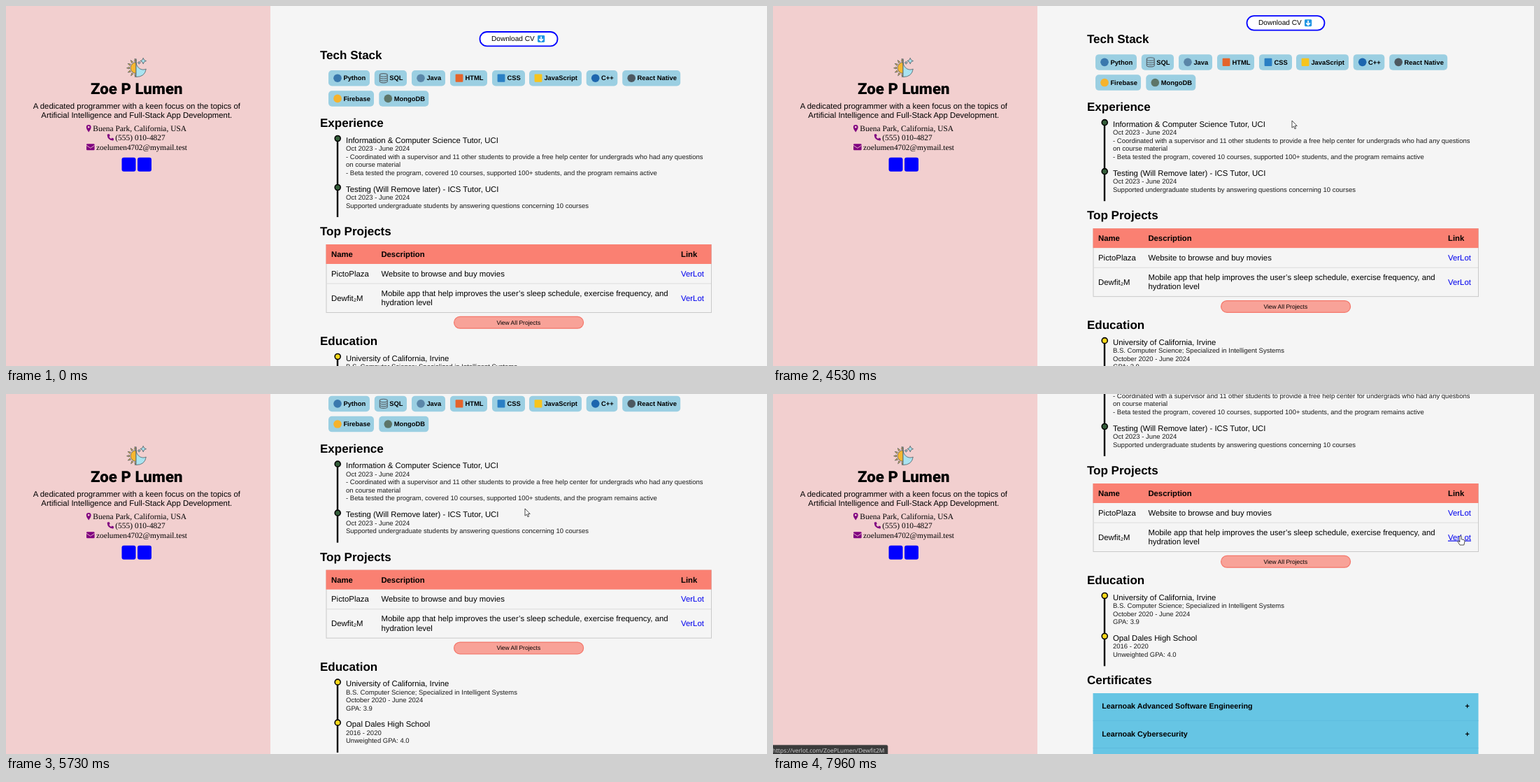
Animation of 1088x515 px, one loop 8 s. Source, as an HTML page:

```html
<!DOCTYPE html>
<html lang="en">
<head>
<meta charset="utf-8">
<title>Resume page</title>
<style>
  html, body { margin: 0; width: 100%; height: 100%; overflow: hidden; background: #f5f5f5; }
  svg { display: block; width: 1088px; height: 515px; }
  text { font-family: "Liberation Sans", Arial, sans-serif; text-rendering: geometricPrecision; white-space: pre; }
  .bold { font-weight: 700; }
  .mid { text-anchor: middle; }
  .small { fill: #1c1c1c; }
  .serif { font-family: "Liberation Serif", "Times New Roman", serif; }
  .name { font-family: Roboto, sans-serif; font-weight: 800; }
  .link { fill: #0000ee; }
  .url { font-family: "Open Sans", "Noto Sans", sans-serif; fill: #d2d2d2; }
</style>
</head>
<body>
<svg viewBox="0 0 1088 515">
  <g id="page"></g>
  <g id="side"></g>
  <g id="status"><path id="bubble" fill="#3b3b3b" stroke="#555" stroke-width=".6"/><text id="url" class="url" x="-1" y="512.6" font-size="8.4"></text></g>
  <g id="cursor" fill="#fff" stroke="#222" stroke-width=".8" stroke-linejoin="round">
    <path id="arrow" d="M0 0V10.2L2.4 8.1 4 11.8 5.6 11.1 4.1 7.5H7.2Z"/>
    <path id="hand" d="M-1.2 0Q-1.1-1 0-1T1.2 0V3.8L4.6 4.6Q6.2 5 6 6.8L4.8 12H-1L-3.9 7.4Q-4.2 6.2-3 6.2L-1.2 7.8Z"/>
  </g>
</svg>
<script>
const LOOP = 8000;
const $ = id => document.getElementById(id);

const text = (x, y, s, size = 11.4, cls = '', extra = '') =>
  `<text x="${x}" y="${y}" font-size="${size}" class="${cls}" ${extra}>${s}</text>`;
const rect = (x, y, w, h, fill, r = 0, extra = '') =>
  `<rect x="${x}" y="${y}" width="${w}" height="${h}" rx="${r}" fill="${fill}" ${extra}/>`;
const circle = (x, y, r, fill, extra = '') => `<circle cx="${x}" cy="${y}" r="${r}" fill="${fill}" ${extra}/>`;
const path = (d, extra) => `<path d="${d}" ${extra}/>`;
const heading = (y, s) => text(449, y, s, 17, 'bold');

// icon: 'o' circle, 's' square, 'd' database cylinder
function badge(x, y, w, label, icon, color) {
  const cx = x + 13, cy = y + 11.2;
  const mark = icon == 'o' ? circle(cx, cy, 5.8, color)
    : icon == 's' ? rect(cx - 5.4, cy - 5.6, 10.8, 11.2, color, 1)
    : path(`M${cx - 5.5} ${cy - 4.4}a5.5 2.2 0 0 1 11 0v8.8a5.5 2.2 0 0 1-11 0Z
        m0 0a5.5 2.2 0 0 0 11 0m-11 3a5.5 2.2 0 0 0 11 0m-11 3a5.5 2.2 0 0 0 11 0`,
        `fill="none" stroke="${color}" stroke-width="1.2"`);
  return rect(x, y, w, 22.5, '#9bcfe2', 5) + mark + text(x + 21.4, y + 14.4, label, 9.4, 'bold');
}

function timeline(end, color, entries) {
  const top = entries[0][0];
  return rect(472.8, top, 2.4, end - top, '#000') + entries.map(([y, title, ...lines]) =>
    circle(474.2, y, 4, color, 'stroke="#000" stroke-width="1.6"') + text(486, y + 6, title, 11.33) +
    lines.map((s, i) => text(486, y + 17.6 + i * 11.5, s, 9.5, 'small')).join('')).join('');
}

const projectLink = (y, id) => text(965, y, 'VerLot', 11.4, 'link', `id="${id}"`);

function drawPage() {
  const dates = 'Oct 2023 - June 2024';
  return rect(677.5, 37, 111, 20.4, '#fff', 10.2, 'id="cv" stroke="#00f" stroke-width="1.8"') +
    text(694, 50.3, 'Download CV', 10.1, '', 'id="cvText"') +
    rect(760, 42, 10.2, 10, '#2196e3', 1.4) +
    path('M765.1 43.6V49.6M762.3 47.2l2.8 2.9 2.8-2.9', 'fill="none" stroke="#fff" stroke-width="1.7"') +
    heading(76, 'Tech Stack') +
    badge(461, 92, 59, 'Python', 'o', '#3a78ad') +
    badge(526.8, 92, 46.2, 'SQL', 'd', '#5b6870') +
    badge(580, 92, 48, 'Java', 'o', '#5a86a8') +
    badge(635, 92, 53, 'HTML', 's', '#e5642b') +
    badge(695, 92, 47, 'CSS', 's', '#2a7fc4') +
    badge(748, 92, 75, 'JavaScript', 's', '#f7c41c') +
    badge(829.7, 92, 44.6, 'C++', 'o', '#1d66ae') +
    badge(881.2, 92, 83, 'React Native', 'o', '#4d5961') +
    badge(461, 121.2, 65, 'Firebase', 'o', '#f6b32c') +
    badge(533.3, 121.2, 71, 'MongoDB', 'o', '#5d7568') +

    heading(173, 'Experience') +
    timeline(302, '#355e3b', [
      [189.5, 'Information &amp; Computer Science Tutor, UCI', dates,
        '- Coordinated with a supervisor and 11 other students to provide a free help center for undergrads who had any questions',
        'on course material',
        '- Beta tested the program, covered 10 courses, supported 100+ students, and the program remains active'],
      [259.5, 'Testing (Will Remove later) - ICS Tutor, UCI', dates,
        'Supported undergraduate students by answering questions concerning 10 courses']]) +

    heading(328.3, 'Top Projects') +
    rect(458, 341.5, 550.5, 97, 'none', 0, 'stroke="#c9c9c9"') +
    rect(457.5, 341, 551, 28, '#fa8072') +
    rect(458, 396.6, 550, 1, '#dcdcdc') +
    text(465, 359, 'Name', 11.33, 'bold') + text(536.4, 359, 'Description', 11.33, 'bold') +
    text(965, 359, 'Link', 11.33, 'bold') +
    text(465, 386.8, 'PictoPlaza') + text(536.4, 386.8, 'Website to browse and buy movies') +
    projectLink(386.8, 'link1') +
    text(465, 421.6, 'Dewfit₂M') +
    text(536.4, 414.8, 'Mobile app that help improves the user’s sleep schedule, exercise frequency, and') +
    text(536.4, 428, 'hydration level') + projectLink(421.6, 'link2') +
    rect(640.6, 444.4, 185, 16.8, '#f8a298', 8.4, 'stroke="#f4776b" stroke-width="1.2"') +
    text(732.8, 455.8, 'View All Projects', 8.5, 'mid') +

    heading(485, 'Education') +
    timeline(602.3, '#ffd91a', [
      [501.5, 'University of California, Irvine', 'B.S. Computer Science; Specialized in Intelligent Systems',
        'October 2020 - June 2024', 'GPA: 3.9'],
      [559.5, 'Opal Dales High School', '2016 - 2020', 'Unweighted GPA: 4.0']]) +

    heading(628.3, 'Certificates') +
    rect(457.5, 641, 551, 118, '#66c5e4') +
    ['Advanced Software Engineering', 'Cybersecurity'].map((s, i) => {
      const y = 663.3 + i * 39.2;
      return text(470.3, y, 'Learnoak ' + s, 10.75, 'bold') + text(992.6, y, '+', 10.75, 'bold mid') +
        rect(457.5, y + 16.5, 551, .8, '#5cb9dc');
    }).join('');
}

function sunMoon() {
  const ink = 'stroke="#4f5d63" stroke-width=".8" stroke-linejoin="round"';
  let rays = '';
  for (let i = 0; i < 7; i++) {
    const a = (95 + i * 28) * Math.PI / 180, at = (r, d) => `${186 + r * Math.cos(a + d)} ${88.5 + r * Math.sin(a + d)}`;
    rays += path(`M${at(9.6, -.13)}L${at(13.4, 0)}L${at(9.6, .13)}Z`, `fill="#f6b93b" ${ink}`);
  }
  const star = (x, y, r) => path(`M${x} ${y - r}l${r * .3} ${r * .7} ${r * .7} ${r * .3} ${-r * .7} ${r * .3} ${-r * .3} ${r * .7}
    ${-r * .3} ${-r * .7} ${-r * .7} ${-r * .3} ${r * .7} ${-r * .3}Z`, `fill="#a9e3f0" ${ink}`);
  return rays + path('M186 80.5a8 8 0 0 0 0 16Z', `fill="#f7b731" ${ink}`) +
    path('M186 75.5Q185 84 189.5 88.3T200.3 90.2Q198.5 101.5 186 101.5Z', `fill="#a9e3f0" ${ink}`) +
    star(196.2, 78.6, 4.3) + star(190.3, 81.2, 2);
}

function drawSide() {
  const purple = 'fill="#800080"';
  return rect(0, 0, 378, 515, '#f2cfcf') + sunMoon() +
    text(186.8, 126, 'Zoe P Lumen', 22.2, 'name mid') +
    text(186.8, 147, 'A dedicated programmer with a keen focus on the topics of', 11.4, 'mid') +
    text(186.8, 160.2, 'Artificial Intelligence and Full-Stack App Development.', 11.4, 'mid') +
    path('M118.2 180.6Q114.8 176 114.8 173.3a3.4 3.4 0 0 1 6.8 0Q121.6 176 118.2 180.6ZM118.2 171.8a1.4 1.4 0 1 0 .01 0Z',
      purple + ' fill-rule="evenodd"') +
    text(124.3, 179.2, 'Buena Park, California, USA', 11.45, 'serif') +
    path('M145.5 183.6l2-.5 1.2 2.6-1.3 1.3q1 2 2.9 2.9l1.3-1.4 2.6 1.3-.5 2.1q-.2.7-1 .7-7.6-.6-8-8 0-.8.8-1Z', purple) +
    text(156.3, 192.3, '(555) 010-4827', 11.45, 'serif') +
    rect(115, 197.3, 11.6, 9, '#800080', 1.1) +
    path('M115 199.4l5.8 3.9 5.8-3.9', 'fill="none" stroke="#f2cfcf" stroke-width=".9"') +
    text(129, 205.6, 'zoelumen4702@mymail.test', 11.3, 'serif') +
    rect(165.5, 216.7, 20, 20, '#00f', 3) + rect(188, 216.7, 20, 20, '#00f', 3);
}

// Each key is [time, value, ...]; linear between keys
function track(keys, t) {
  const i = keys.findIndex(k => k[0] > t);
  if (i < 0) return keys[keys.length - 1].slice(1);
  if (!i) return keys[0].slice(1);
  const a = keys[i - 1], b = keys[i], p = (t - a[0]) / (b[0] - a[0]);
  return a.slice(1).map((v, j) => v + (b[j + 1] - v) * p);
}

const cursorPath = [
  [290, 966, 458], [490, 721, 330], [780, 721, 330], [960, 378, 197], [1170, 378, 197],
  [1400, 290, 140], [1550, 235, 137], [1750, 190, 180], [1950, 170, 219], [2020, 170, 219],
  [2090, 186, 237], [2160, 186, 237], [2300, 177, 227], [2550, 200, 227], [2830, 194, 224],
  [2870, 194, 224], [3140, 594, 119], [3250, 594, 119], [3560, 728, 46], [3720, 733, 40],
  [3985, 733, 40], [4250, 742, 164], [6650, 742, 164], [6850, 800, 154], [7150, 910, 156],
  [7430, 985, 168], [7480, 985, 168], [7620, 984, 172], [7760, 982, 198], [7960, 983, 204]];
const scrollPath = [
  [4350, 0], [4390, 4], [4520, 22], [4650, 32], [4790, 36.5], [4950, 36.5], [5130, 66], [5330, 86],
  [5700, 86], [5730, 89], [5870, 138], [6010, 160], [6270, 160], [6300, 170], [6380, 199.5], [6430, 208], [6500, 213]];
const buttonFade = [[3480, 0], [3680, 1], [3990, 1], [4200, 0]];
const statusFade = [
  [2300, 0], [2400, 1], [2640, 1], [2820, 0], [3540, 0], [3640, 1], [3850, 1], [3920, .5],
  [4250, .1], [4390, 0], [7560, 0], [7640, 1]];

const host = 'https://verlot.com/ZoePLumen';
const statusAt = t =>
  t < 3000 ? [host, 124]
  : t < 7000 ? ['https://zoeplumen.verlot.io/resume/Resume_Zoe_Lumen.pdf', 238]
  : t < 7760 ? [host + '/PictoPlaza', 168]
  : [host + '/Dewfit2M', 164];

function render(t) {
  $('page').setAttribute('transform', `translate(0 ${-track(scrollPath, t)[0]})`);

  const [x, y] = track(cursorPath, t);
  const onRow = rowY => t >= 7500 && Math.abs(y - rowY) < 7;
  const pointing = t > 2200 && t < 2890 || t > 3500 && t < 4010 || onRow(169) || onRow(204);
  $('cursor').setAttribute('transform', `translate(${x} ${y})`);
  $('cursor').style.display = t < 290 ? 'none' : '';
  $('arrow').style.display = pointing ? 'none' : '';
  $('hand').style.display = pointing ? '' : 'none';
  $('link1').style.textDecoration = onRow(169) ? 'underline' : 'none';
  $('link2').style.textDecoration = onRow(204) ? 'underline' : 'none';

  const b = track(buttonFade, t)[0], pale = 255 * (1 - b);
  $('cv').setAttribute('fill', `rgb(${pale},${pale},255)`);
  $('cvText').setAttribute('fill', `rgb(${255 * b},${255 * b},${255 * b})`);

  const [url, width] = statusAt(t);
  $('status').setAttribute('opacity', track(statusFade, t)[0]);
  $('bubble').setAttribute('d', `M-2 502.3H${width - 2}q2 0 2 2V517H-2Z`);
  $('url').textContent = url;
}

$('page').innerHTML = drawPage();
$('side').innerHTML = drawSide();
const start = performance.now();
function frame() {
  render((performance.now() - start) % LOOP);
  requestAnimationFrame(frame);
}
frame();
</script>
</body>
</html>
```
